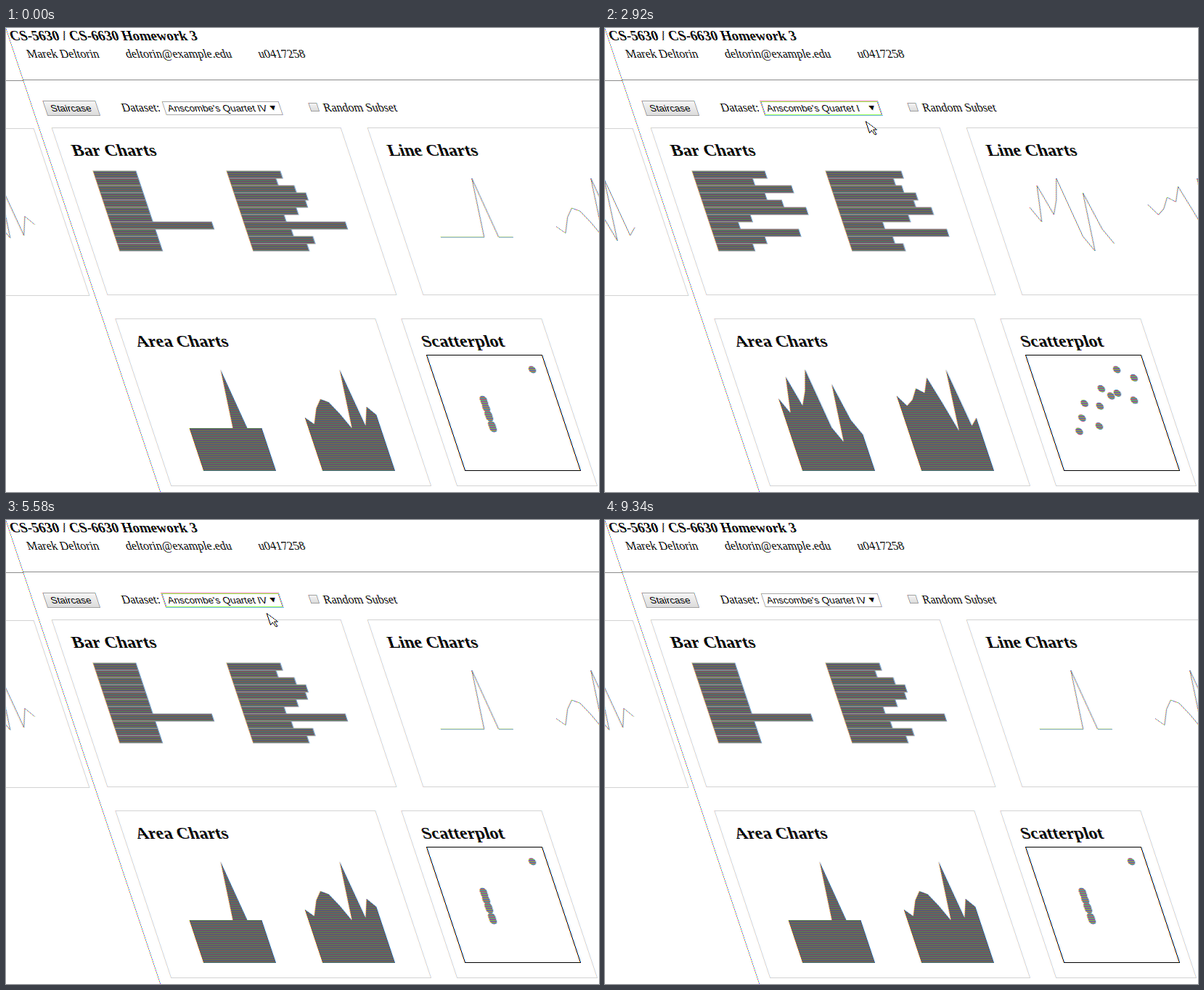
Recreate the animation shown at these times as an HTML page with a canvas. Size 817 by 639 pixels, loop 9400 ms.

```html
<!DOCTYPE html>
<html lang="en">
<head>
<meta charset="utf-8">
<title>Skewed chart page</title>
<style>
html, body { margin: 0; width: 100%; height: 100%; overflow: hidden; background: #fff; }
canvas { display: block; }
</style>
</head>
<body>
<canvas id="stage" width="817" height="639"></canvas>
<script>
const W = 817, H = 639, LOOP = 9400, STEP = 80;
const SERIF = '"Liberation Serif", "Times New Roman", serif';
const SANS = '"Liberation Sans", Arial, sans-serif';
const CONTROL = '13.33px ' + SANS;
const FILL = '#46647d', LINE = '#4682b4', FOCUS = '#4d90fe';

const stage = document.getElementById('stage').getContext('2d');
const pageCanvas = document.createElement('canvas');
pageCanvas.width = W;
pageCanvas.height = H;
const page = pageCanvas.getContext('2d', { willReadFrequently: true });

// Anscombe's quartet
const xs = [10, 8, 13, 9, 11, 14, 6, 4, 12, 7, 5];
const quartet = [
  { a: xs, b: [8.04, 6.95, 7.58, 8.81, 8.33, 9.96, 7.24, 4.26, 10.84, 4.82, 5.68] },
  { a: xs, b: [9.14, 8.14, 8.74, 8.77, 9.26, 8.1, 6.13, 3.1, 9.13, 7.26, 4.74] },
  { a: xs, b: [7.46, 6.77, 12.74, 7.11, 7.81, 8.84, 6.08, 5.39, 8.15, 6.42, 5.73] },
  { a: xs.map((_, i) => i === 7 ? 19 : 8),
    b: [6.58, 5.76, 7.71, 8.84, 8.47, 7.04, 5.25, 12.5, 5.56, 7.91, 6.89] }
];
const names = ['I', 'II', 'III', 'IV'].map(n => "Anscombe's Quartet " + n);
const subset = [0, 2, 3, 6, 7];

// time, x, y of the pointer in page coordinates
const pointerPath = [
  [700, 700, 660], [1400, 322, 110], [1700, 322, 110], [1950, 318, 127],
  [2200, 316, 128], [5900, 316, 128], [6480, 389, 108], [8100, 389, 108], [8800, 700, 660]
];

function pointerAt(t) {
  const i = pointerPath.findIndex(p => p[0] > t);
  if (i < 1) return null;
  const [t0, x0, y0] = pointerPath[i - 1], [t1, x1, y1] = pointerPath[i];
  const k = (t - t0) / (t1 - t0);
  return [x0 + (x1 - x0) * k, y0 + (y1 - y0) * k].map(Math.round);
}

function stateAt(t) {
  return {
    set: t < 2200 || t >= 5240 ? 3 : t < 3160 ? 0 : t < 4280 ? 1 : 2,
    open: t >= 1560 && t < 2200,
    hover: t >= 1800 ? 0 : 3,
    focus: t >= 1560 && t < 6600,
    checked: t >= 6600 && t < 7700,
    pointer: pointerAt(t)
  };
}

function text(str, x, y, font, color = '#000') {
  page.font = font;
  page.fillStyle = color;
  page.fillText(str, x, y);
}

function frame(x, y, w, h, color) {
  page.strokeStyle = color;
  page.lineWidth = 1;
  page.strokeRect(x + .5, y + .5, w, h);
}

function polygon(points, fill, stroke) {
  page.beginPath();
  points.forEach(([x, y]) => page.lineTo(x, y));
  page.closePath();
  page.fillStyle = fill;
  page.fill();
  if (stroke) {
    page.strokeStyle = stroke;
    page.stroke();
  }
}

function gradientBox(x, y, w, h) {
  const g = page.createLinearGradient(0, y, 0, y + h);
  g.addColorStop(0, '#f6f6f6');
  g.addColorStop(1, '#dcdcdc');
  page.fillStyle = g;
  page.fillRect(x, y, w, h);
  frame(x, y, w, h, '#a0a0a0');
}

function scaled(values) {
  const max = Math.max(...values);
  return values.map(v => 140 * v / max);
}

function bars(values, left) {
  page.lineWidth = 1;
  page.fillStyle = FILL;
  page.strokeStyle = '#96969c';
  values.forEach((v, i) => {
    page.fillRect(left, 197 + 10 * i, v, 10);
    page.strokeRect(left, 197 + 10 * i, v, 10);
  });
}

function curve(values, left, base) {
  return values.map((v, i) => [left + i * 110 / values.length, base - v]);
}

function line(values, left) {
  page.beginPath();
  curve(values, left, 347).forEach(([x, y]) => page.lineTo(x, y));
  page.strokeStyle = LINE;
  page.lineWidth = 1;
  page.stroke();
}

function area(values, left) {
  const top = curve(values, left, 610);
  polygon([[left, 610], ...top, [top[top.length - 1][0], 610]], FILL);
}

function charts(a, b) {
  bars(a, 54.5);
  bars(b, 238.5);
  line(a, 503);
  line(b, 667);
  area(a, 69);
  area(b, 233);
  page.fillStyle = LINE;
  a.forEach((v, i) => {
    page.beginPath();
    page.arc(428.5 + v, 610.5 - b[i], 5, 0, 7);
    page.fill();
  });
}

function panel(title, x, y, w) {
  frame(x, y, w, 230, '#d3d3d3');
  text(title, x + 18, y + 39, 'bold 24px ' + SERIF);
}

function controls(s) {
  gradientBox(17, 100, 72, 20);
  text('Staircase', 25, 115, CONTROL);
  text('Dataset:', 123, 115, '16px ' + SERIF);
  frame(181, 101, 160, 18, s.focus ? FOCUS : '#a9a9a9');
  if (s.focus) {
    page.globalAlpha = .7;
    frame(180, 100, 162, 20, FOCUS);
    page.globalAlpha = 1;
  }
  text(names[s.set], 186, 115, CONTROL);
  polygon([[327.5, 107], [335, 107], [331.2, 113.5]], '#000');
  gradientBox(382, 103, 11, 11);
  if (s.checked) {
    page.beginPath();
    page.moveTo(384.5, 109);
    page.lineTo(387, 112);
    page.lineTo(392, 105);
    page.strokeStyle = '#333';
    page.lineWidth = 2.5;
    page.stroke();
  }
  text('Random Subset', 401, 115, '16px ' + SERIF);
}

function menu(hover) {
  page.fillStyle = '#fff';
  page.fillRect(181, 120, 161, 69);
  frame(181, 120, 160, 68, FOCUS);
  names.forEach((name, i) => {
    const y = Math.round(132.5 + 16.5 * i);
    if (i === hover) {
      page.fillStyle = '#1e90ff';
      page.fillRect(182, y - 12, 159, 16);
    }
    text(name, 186, y, '13px ' + SANS, i === hover ? '#fff' : '#000');
  });
}

function pointer(x, y) {
  const shape = [[0, 0], [0, 16], [4, 12.5], [6.5, 18.5], [9, 17.5], [6.5, 11.5], [11.5, 11.5]];
  page.lineWidth = 1;
  polygon(shape.map(([dx, dy]) => [x + dx + .5, y + dy + .5]), '#fff', '#000');
}

function drawPage(s) {
  page.fillStyle = '#fff';
  page.fillRect(0, 0, W, H);
  text('CS-5630 / CS-6630 Homework 3', 2, 17, 'bold 18.72px ' + SERIF);
  text('Marek Deltorin', 17, 41, '16px ' + SERIF);
  text('deltorin@example.edu', 153, 41, '16px ' + SERIF);
  text('u0417258', 336, 41, '16px ' + SERIF);
  page.fillStyle = '#8c8c8c';
  page.fillRect(0, 71, W, 1);

  controls(s);
  panel('Bar Charts', 17, 137, 398);
  panel('Line Charts', 452, 137, 357);
  panel('Area Charts', 17, 400, 358);
  panel('Scatterplot', 411, 400, 193);

  const { a, b } = quartet[s.set];
  const pick = list => scaled(s.checked ? subset.map(i => list[i]) : list);
  charts(pick(a), pick(b));
  frame(429, 450, 159, 159, '#000');
  if (s.open) menu(s.hover);
  if (s.pointer) pointer(...s.pointer);
}

// Rows are stored as RGB with one zero padding byte and read back without it,
// so every row slips right by one colour channel.
const stride = 3 * W + 1;
const bytes = new Uint8Array(stride * H);
const output = stage.createImageData(W, H);

function skewPage() {
  const src = page.getImageData(0, 0, W, H).data, dst = output.data;
  for (let y = 0, i = 0; y < H; y++) {
    for (let x = 0, o = y * stride; x < W; x++, i += 4) {
      bytes[o++] = src[i];
      bytes[o++] = src[i + 1];
      bytes[o++] = src[i + 2];
    }
  }
  for (let p = 0, k = 0; p < dst.length; p += 4) {
    dst[p] = bytes[k++];
    dst[p + 1] = bytes[k++];
    dst[p + 2] = bytes[k++];
    dst[p + 3] = 255;
  }
  stage.putImageData(output, 0, 0);
}

let shown = '';
function tick() {
  const t = performance.now() % LOOP;
  const state = stateAt(Math.max(0, Math.floor((t + 20) / STEP) * STEP - 20));
  const key = JSON.stringify(state);
  if (key !== shown) {
    shown = key;
    drawPage(state);
    skewPage();
  }
  requestAnimationFrame(tick);
}
tick();
</script>
</body>
</html>
```
